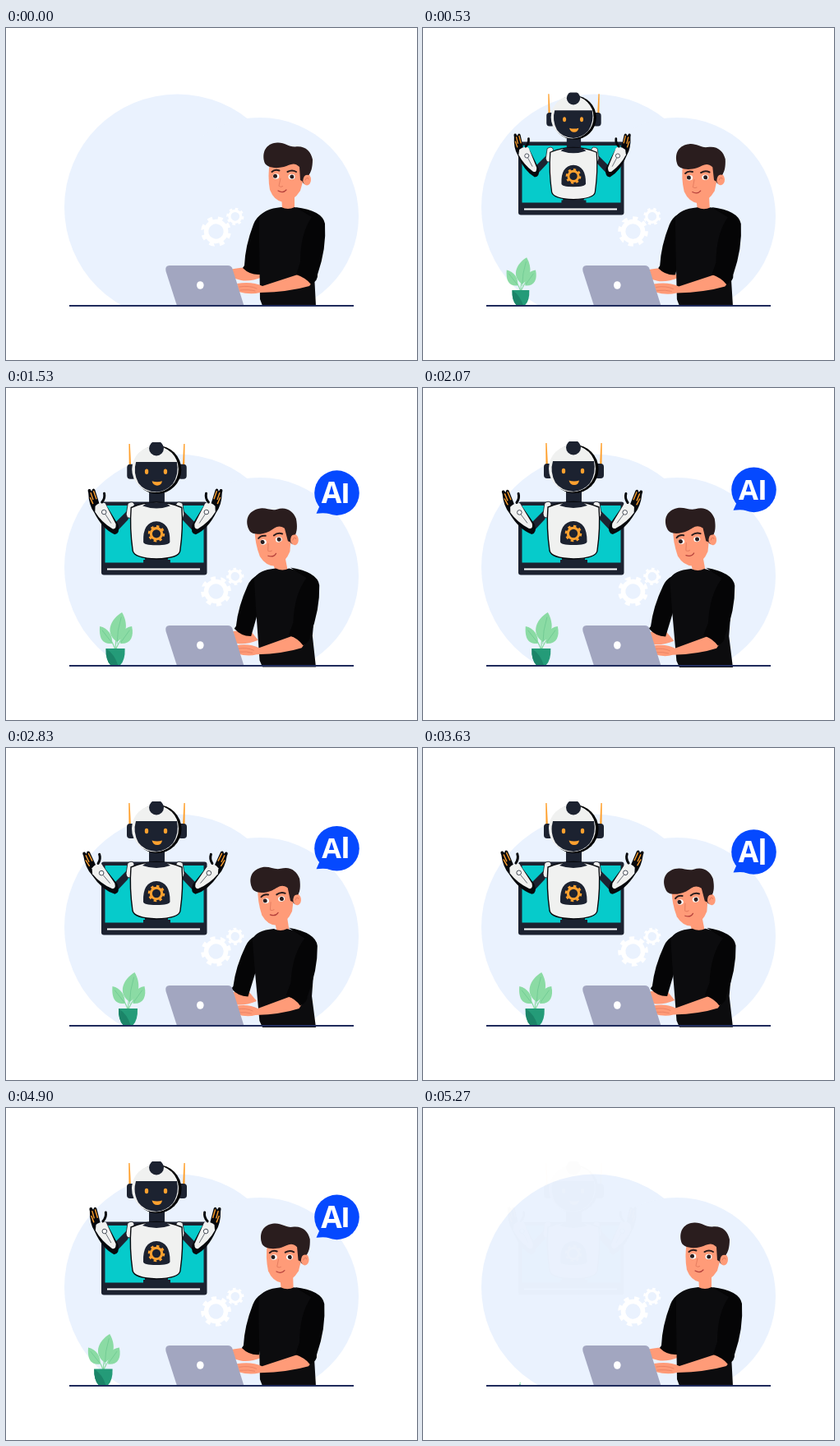
These frames come from a looping animation (500 by 404 pixels, 5.31 s). An HTML page:

```html
<!DOCTYPE html>
<html lang="en">
<head>
<meta charset="utf-8">
<title>Working with an assistant robot</title>
<style>
html, body { margin: 0; width: 100%; height: 100%; overflow: hidden; background: #fff; }
svg { display: block; width: 500px; height: 404px; }
.skin { fill: #ff9b78; }
.hair { fill: #2a1d1e; }
.dark { fill: #1c2230; }
.white { fill: #f0f1f0; }
.orange { fill: #ffa12f; }
.line { fill: none; stroke-linecap: round; stroke-linejoin: round; }
.crease { stroke: #e57d60; }
text { font: 700 36px "Open Sans", "Noto Sans", sans-serif; fill: #fff; text-anchor: middle; }
</style>
</head>
<body>
<svg viewBox="0 0 500 404">
  <defs>
    <clipPath id="ground"><path d="M0 0H500V338H0z"/></clipPath>
    <clipPath id="top"><path d="M0 65H500V338H0z"/></clipPath>
    <g id="gear" fill="none">
      <circle r="12" stroke-width="5.6"/>
      <circle r="16" stroke-width="4.6" pathLength="16" stroke-dasharray=".95 1.05"/>
    </g>
    <g id="arm">
      <path class="dark" d="M154 146L148 160L133 176L126 170L146 150z"/>
      <path class="white" d="M148 140Q154 136 156 141L153 157Q147 160 146 153z" stroke="#10141c" stroke-width=".8"/>
      <g class="fore">
        <path d="M98 128Q96 123 100 123.500L102 126Q103 121 106 124L112 141L121 143L136 166Q139 177 132 178Q117 172 106 152Q99 143 98 128z" fill="#06080c"/>
        <path class="white" d="M107 144Q113 138 119 140L133 165Q134 172 129 171Q115 163 107 151z"/>
        <circle cx="118" cy="151" r="2.800" fill="#fff" stroke="#333a46" stroke-width=".9"/>
        <path class="line" d="M120 154L127 164" stroke="#333a46" stroke-width=".7"/>
        <path class="line" d="M115 139Q119 134 117.500 128" stroke="#06080c" stroke-width="3"/>
        <path class="line" d="M101 128L104 136M104.500 126L108 135M100.500 134L104 141" stroke="#ffa12f" stroke-width="1.400"/>
      </g>
    </g>
  </defs>

  <g fill="#eaf2fe" clip-path="url(#ground)">
    <circle cx="208.500" cy="218" r="137.500"/>
    <circle cx="309" cy="229" r="120"/>
  </g>
  <g stroke="#fff">
    <use id="bigGear" href="#gear"/>
    <use id="smallGear" href="#gear"/>
  </g>

  <g id="screen">
    <rect class="dark" x="116" y="138.500" width="128.500" height="89" rx="3"/>
    <path d="M120.500 143H240.500V212.500H120.500z" fill="#06cbcb"/>
    <path d="M123 220.500H236" stroke="#fff" stroke-width="2"/>
    <g id="robot"><g clip-path="url(#top)">
      <path class="dark" d="M169 204H197V209H200V213H167V209H169z"/>
      <use href="#arm"/>
      <use href="#arm" transform="matrix(-1 0 0 1 363 0)"/>
      <path class="orange" d="M149.200 67H150.600L152 95H149.500zM216.400 67H217.800L217.500 95H215z"/>
      <rect class="dark" x="147" y="92" width="11" height="18" rx="4"/>
      <rect class="dark" x="209" y="92" width="11" height="18" rx="4"/>
      <path class="dark" d="M174 124H193V144H174z"/>
      <circle cx="184" cy="98.500" r="29.500" fill="#000"/>
      <circle class="white" cx="181.500" cy="98" r="28.500"/>
      <path class="dark" d="M158 89H208Q211 104 203 116Q195 125 183 126Q168 125 161 115Q154 102 158 89z"/>
      <circle class="dark" cx="183" cy="72.500" r="9"/>
      <ellipse class="orange" cx="171" cy="101" rx="2.200" ry="3.200"/>
      <ellipse class="orange" cx="194" cy="101" rx="2.200" ry="3.200"/>
      <path class="orange" d="M177.500 112.500Q184 114.500 190 112.500Q189 118 184 118Q179 118 177.500 112.500z"/>
      <path class="white" d="M152 145Q183 132 214 145Q216 170 212 198Q211 207 183 208Q156 207 154 198Q150 170 152 145z"
        stroke="#06080c" stroke-width="1.400"/>
      <path class="dark" d="M166 143Q183 149 200 143L194 139H172z"/>
      <path class="dark" d="M167 187Q166 163 183 162Q200 163 199.500 187Q199 191 183 191Q167 191 167 187z"/>
      <use href="#gear" stroke="#ffa12f" transform="translate(183 177) scale(.56)"/>
    </g></g>
  </g>

  <g id="plant">
    <path class="line" d="M0 -18Q0 -34 4 -44M0 -18Q-4 -30 -9 -34M0 -18Q5 -30 10 -34" stroke="#8bdba4" stroke-width="1.200"/>
    <g fill="#8bdba4">
      <path d="M2 -28C-13 -38 -7 -55 8 -64C16 -50 14 -36 2 -28z"/>
      <path d="M-4 -26C-17 -25 -20 -34 -19 -47C-9 -45 -3 -36 -4 -26z"/>
      <path d="M6 -26C5 -37 10 -46 20 -47C23 -34 18 -25 6 -26z"/>
    </g>
    <path class="line" d="M2 -26Q2 -42 7 -58M-5 -28L-16 -42M7 -28L17 -42" stroke="#68c58e" stroke-width=".7"/>
    <path d="M-11.500 -20H11.500Q12 -6 6 0H-6Q-12 -6 -11.500 -20z" fill="#249b78"/>
    <path d="M-11.500 -20Q-1 -13 3 0H-6Q-12 -6 -11.500 -20z" fill="#1b8468"/>
  </g>

  <g id="man">
    <path class="skin" id="backHand" d="M272 294Q285 291 302 291L312 303Q297 309 286 307L272 303z"/>
    <path id="backArm" fill="#050506" d="M334 219Q307 222 301 239Q291 265 290 289L288 292Q297 301 309 300L320 250z"/>
    <path class="skin head" d="M335 202H351V221Q343 224 336 220z"/>
    <path id="torso" fill="#0c0c0e" d="M335 218Q313 220 308 231V262L309 330L312 338H377L375 300L384 240Q380 224 351 218Q343 222 335 218z"/>
    <g id="foreArm">
      <path class="skin" d="M355 300L312 314Q299 308 281 311L283 321Q297 325 309 322Q345 321 369 314L376 305z"/>
      <path class="line crease" d="M284 315Q296 313 305 317M285 319Q296 318 303 320" stroke-width=".8"/>
    </g>
    <path id="sleeve" fill="#050506" d="M352 218Q385 222 388 238Q390 268 379 300Q380 307 371 312Q365 304 353 300L358 285Q358 250 372 230z"/>
    <g class="head">
      <path class="hair" d="M355 160H372Q372 176 363 190L357 184z"/>
      <ellipse class="skin" cx="366" cy="184.500" rx="5" ry="7"/>
      <path class="skin" d="M321 164Q318 180 321 197Q326 210 337 212Q350 211 358 198L363 180L357 160z"/>
      <path class="line crease" d="M364 185Q367 180 368 184"/>
      <path class="hair" d="M314 162C311 148 319 140 330 139.500C339 139 344 145 352 144.500C364 143 371 150 373 160C373 170 371 176 368 179Q362 177 361 187L358 185L357 169C350 162 345 167 338 169C326 172 315 169 314 162z"/>
      <path class="line" d="M323.500 175Q327 171.500 332.500 173.500M342.500 175Q348 172 353 175" stroke="#2a1d1e" stroke-width="2"/>
      <ellipse cx="328.500" cy="180.500" rx="3.800" ry="3.200" fill="#fff"/>
      <ellipse cx="347.500" cy="181" rx="4" ry="3.200" fill="#fff"/>
      <circle class="hair" cx="327.500" cy="180.300" r="2.500"/>
      <circle class="hair" cx="347.800" cy="181" r="2.500"/>
      <path class="line crease" d="M334 183L332 192Q334 194 336.500 192.500"/>
      <path class="line" d="M331 198Q337 201.500 341 197" stroke="#b5413c" stroke-width="1.200"/>
    </g>
  </g>

  <path d="M199 289H270Q274 289 275.500 293L289.500 338H208L194.500 296Q193 289 199 289z" fill="#a2a6c0"/>
  <ellipse cx="236.300" cy="313" rx="4.300" ry="4.800" fill="#fff"/>
  <path d="M77 338H423" stroke="#1f2b5c" stroke-width="2"/>

  <g id="bubble">
    <circle r="27.300" fill="#0549ff"/>
    <path d="M-21 16L-25 25Q-17 24 -9 25z" fill="#0549ff"/>
    <text id="letterA">A</text>
    <text id="letterI">I</text>
  </g>
</svg>
<script>
const LOOP = 5310;
const $ = id => document.getElementById(id);
const move = (el, value) => el.setAttribute('transform', value);
const moveAll = (selector, value) => document.querySelectorAll(selector).forEach(el => move(el, value));

// Smooth step from 0 to 1 between two times
function ease(t, from, to) {
  const u = Math.min(1, Math.max(0, (t - from) / (to - from)));
  return u * u * (3 - 2 * u);
}
const visible = (t, from, to, end, gone) => ease(t, from, to) - ease(t, end, gone);

function draw(t) {
  const turn = 2 * Math.PI * t / LOOP;
  const swing = (1 - Math.cos(turn)) / 2;    // 0 to 1 and back, once per loop
  const drift = swing ** 1.5;                // lingers at the start
  const lean = 1 - (1 - swing) ** 1.4;       // lingers at the far side

  const spin = 360 * t / LOOP;
  move($('bigGear'), `translate(255.500 247.500) rotate(${spin + 8})`);
  move($('smallGear'), `translate(278.800 229.300) rotate(${-spin}) scale(.58)`);

  // The robot settles back, then leans out of the screen with its arms swinging
  const size = .97 - .07 * ease(t, 0, 700) + .1 * ease(t, 1070, 1620);
  $('screen').setAttribute('opacity', visible(t, 30, 450, 4930, 5290));
  move($('robot'), `translate(183 215) scale(${size}) translate(-183 -215)`);
  moveAll('.fore', `rotate(${1 + 6.3 * Math.cos(turn - .41)} 130 172)`);

  // The man leans to the laptop: torso shears above the hem, arms follow
  const tilt = 8.5 * swing + 6 * Math.sin(turn) ** 2;
  moveAll('.head', `translate(${-.85 * tilt} ${.35 * tilt}) rotate(${-tilt} 342 214)`);
  move($('torso'), `translate(0 ${2 * lean}) translate(0 338) skewX(${4.4 * lean}) translate(0 -338)`);
  move($('backArm'), `translate(${-9 * lean} ${3 * lean}) rotate(${4.7 * lean} 312 232)`);
  move($('backHand'), `translate(${-7 * lean} ${5 * lean})`);
  move($('sleeve'), `translate(${-9 * lean} ${2 * lean}) rotate(${3 * lean} 375 235)`);
  move($('foreArm'), `translate(${281 - 2 * lean} ${3 * lean}) scale(${1 - .12 * lean} 1) translate(-281 0)`);

  move($('plant'), `translate(${118 + 31 * drift} 337) scale(${visible(t, 30, 650, 4850, 5340)})`);

  const stretch = Math.exp(-(((t - 3600) / 500) ** 2));
  $('bubble').setAttribute('opacity', visible(t, 540, 850, 4950, 5270));
  move($('bubble'), `translate(402.500 ${133 - 11 * drift})`);
  move($('letterA'), `translate(-6.500 0) scale(${1.03 - .08 * drift}) translate(0 12.500)`);
  move($('letterI'), `translate(10.500 0) scale(1 ${.96 + .26 * stretch}) translate(0 12.500)`);
}

const start = performance.now();
function tick() {
  draw((performance.now() - start) % LOOP);
  requestAnimationFrame(tick);
}
tick();
</script>
</body>
</html>
```
